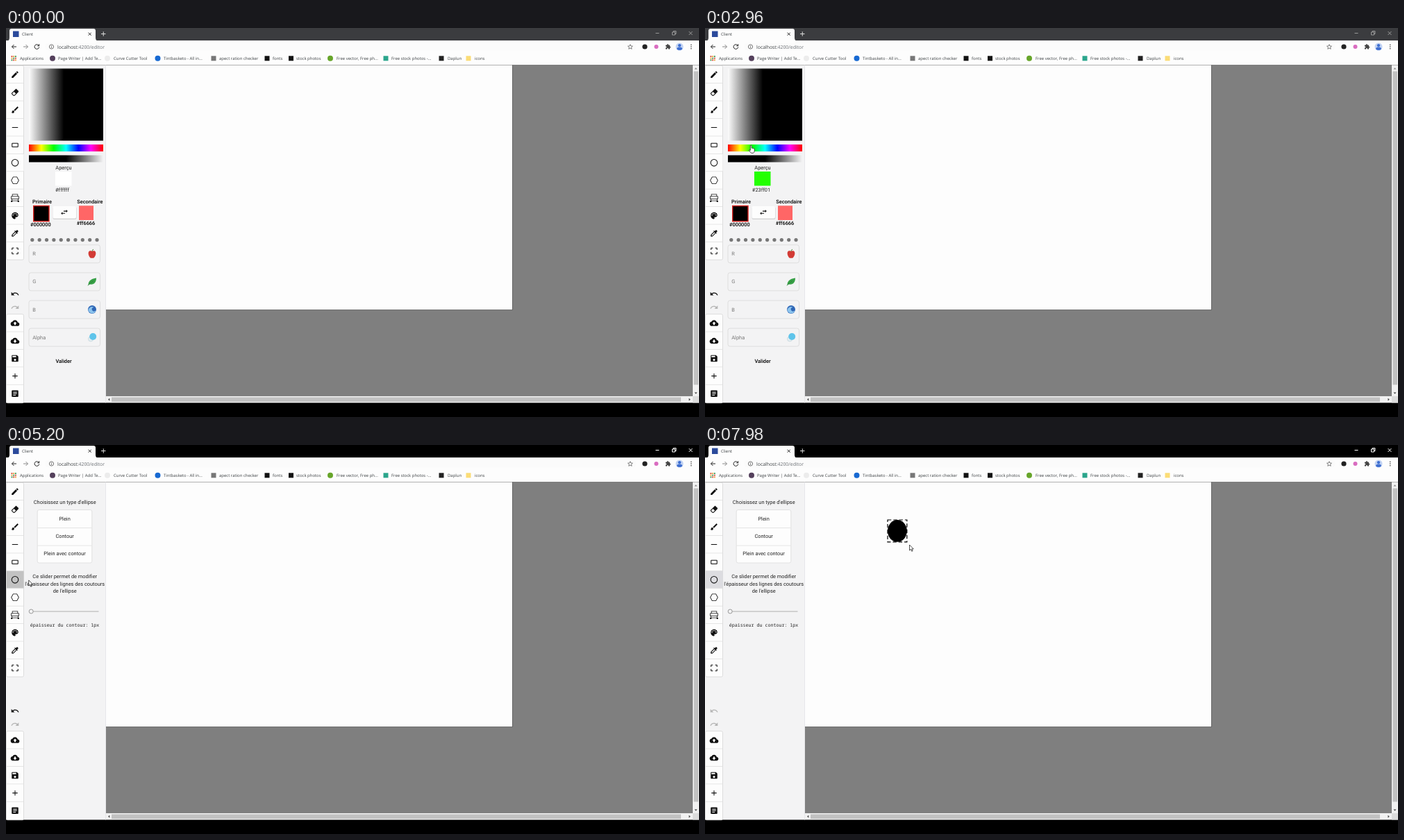
These frames come from a looping animation (998 by 561 pixels, 8 s). An HTML page:

```html
<!DOCTYPE html>
<html lang="fr">
<head>
<meta charset="utf-8">
<title>Client</title>
<style>
  html, body { margin: 0; width: 100%; height: 100%; overflow: hidden; background: #000; }
  svg { display: block; width: 100vw; height: 100vh; }
  text { font: 7.4px Roboto, sans-serif; fill: #222; text-rendering: geometricPrecision; white-space: pre; }
  .ui { font: 5.97px "Open Sans", sans-serif; fill: #3c4043; }
  .url { font-size: 6.87px; }
  .mid { text-anchor: middle; }
  .strong { font-weight: 500; fill: #000; }
  .muted { fill: #777; }
  .mono { font: 6.65px "Noto Sans Mono", monospace; }
  .tip { font-size: 5px; font-weight: 500; fill: #fff; }
  .line { fill: none; stroke: #222; stroke-width: 1; }
</style>
</head>
<body>
<svg id="stage" viewBox="0 0 998 561"></svg>
<script>
const LOOP = 8000;
const HUE = { x: 33, width: 107 };
const TOOL_PITCH = 25.43;
const DRAW_START = 7560;

const rect = (x, y, w, h, fill, extra = '') =>
  `<rect x="${x}" y="${y}" width="${w}" height="${h}" fill="${fill}" ${extra}/>`;
const circle = (x, y, r, fill, extra = '') =>
  `<circle cx="${x}" cy="${y}" r="${r}" fill="${fill}" ${extra}/>`;
const path = (d, extra = 'class="line"') => `<path d="${d}" ${extra}/>`;
const text = (x, y, str, cls = '', extra = '') =>
  `<text x="${x}" y="${y}" class="${cls}" ${extra}>${str}</text>`;
const icon = (x, y, d, extra = 'fill="#111"', scale = 0.53) =>
  `<path transform="translate(${x} ${y}) scale(${scale}) translate(-12 -12)" fill-rule="evenodd" d="${d}" ${extra}/>`;
const gradient = (id, stops) => `<linearGradient id="${id}">` +
  stops.map(([at, color, alpha = 1]) => `<stop offset="${at}" stop-color="${color}" stop-opacity="${alpha}"/>`).join('') +
  '</linearGradient>';
const range = (n, fn) => Array.from({ length: n }, (_, i) => fn(i)).join('');

const CLOUD = 'M19.35 10.04C18.67 6.59 15.64 4 12 4 9.11 4 6.6 5.64 5.35 8.04 2.34 8.36 0 10.91 0 14c0 3.31 2.69 6 6 6h13c2.76 0 5-2.24 5-5 0-2.64-2.05-4.78-4.65-4.96z';
const ICONS = {
  pencil: 'M3 17.25V21h3.75L17.81 9.94l-3.75-3.75zM20.71 7.04c.39-.39.39-1.02 0-1.41l-2.34-2.34c-.39-.39-1.02-.39-1.41 0l-1.83 1.83 3.75 3.75z',
  eraser: 'M16.24 3.56l4.95 4.94c.78.79.78 2.05 0 2.84L12 20.53a4 4 0 0 1-5.66 0L2.81 17c-.78-.79-.78-2.05 0-2.84l10.6-10.6c.79-.78 2.05-.78 2.83 0M4.22 15.58l3.54 3.53c.78.79 2.04.79 2.83 0l3.53-3.53-4.95-4.95z',
  brush: 'M7 14c-1.66 0-3 1.34-3 3 0 1.31-1.16 2-2 2 .92 1.22 2.49 2 4 2 2.21 0 4-1.79 4-4 0-1.66-1.34-3-3-3zm13.71-9.37l-1.34-1.34c-.39-.39-1.02-.39-1.41 0L9 12.25 11.75 15l8.96-8.96c.39-.39.39-1.02 0-1.41z',
  line: 'M4 11h16v2H4z',
  box: 'M5 6h14a2 2 0 0 1 2 2v8a2 2 0 0 1-2 2H5a2 2 0 0 1-2-2V8a2 2 0 0 1 2-2zM5 8v8h14V8z',
  ellipse: 'M12 2a10 10 0 1 0 0 20a10 10 0 1 0 0-20zM12 4a8 8 0 1 1 0 16a8 8 0 1 1 0-16z',
  hexagon: 'M6.5 2h11L23 12l-5.5 10h-11L1 12zM7.5 3.6L2.8 12l4.7 8.4h9L21.2 12l-4.7-8.4z',
  stamp: 'M4 1h16v6h3v8h-2v4h2v4h-4v-3H5v3H1v-4h2v-4H1V7h3zM5.5 2.5V7h13V2.5zM2.5 8.5v5h19v-5zM4.5 15v3.5h15V15z',
  palette: 'M12 3c-4.97 0-9 4.03-9 9s4.03 9 9 9c.83 0 1.5-.67 1.5-1.5 0-.39-.15-.74-.39-1.01-.23-.26-.38-.61-.38-.99 0-.83.67-1.5 1.5-1.5H16c2.76 0 5-2.24 5-5 0-4.42-4.03-8-9-8zM6.5 9a1.5 1.5 0 1 0 0 3a1.5 1.5 0 1 0 0-3zM9.5 5a1.5 1.5 0 1 0 0 3a1.5 1.5 0 1 0 0-3zM14.5 5a1.5 1.5 0 1 0 0 3a1.5 1.5 0 1 0 0-3zM17.5 9a1.5 1.5 0 1 0 0 3a1.5 1.5 0 1 0 0-3z',
  dropper: 'M20.71 5.63l-2.34-2.34c-.39-.39-1.02-.39-1.41 0l-3.12 3.12-1.93-1.91-1.41 1.41 1.42 1.42L3 16.25V21h4.75l8.92-8.92 1.42 1.42 1.41-1.41-1.92-1.92 3.12-3.12c.4-.4.4-1.03.01-1.42zM6.92 19L5 17.08l8.06-8.06 1.92 1.92z',
  frame: 'M3 5v4h2V5h4V3H5c-1.1 0-2 .9-2 2zm2 10H3v4c0 1.1.9 2 2 2h4v-2H5zm14 4h-4v2h4c1.1 0 2-.9 2-2v-4h-2zm0-16h-4v2h4v4h2V5c0-1.1-.9-2-2-2z',
  upload: CLOUD + 'M14 13v4h-4v-4H7l5-5 5 5z',
  download: CLOUD + 'M17 13l-5 5-5-5h3V9h4v4z',
  save: 'M17 3H5c-1.11 0-2 .9-2 2v14c0 1.1.89 2 2 2h14c1.1 0 2-.9 2-2V7zM12 13a3 3 0 1 0 0 6a3 3 0 1 0 0-6zM15 9H5V5h10z',
  add: 'M19 13h-6v6h-2v-6H5v-2h6V5h2v6h6z',
  article: 'M19 3H5c-1.1 0-2 .9-2 2v14c0 1.1.9 2 2 2h14c1.1 0 2-.9 2-2V5c0-1.1-.9-2-2-2zM14 17H7v-2h7zM17 13H7v-2h10zM17 9H7V7h10z',
};
const UNDO = 'M12.5 8c-2.65 0-5.05.99-6.9 2.6L2 7v9h9l-3.62-3.62c1.39-1.16 3.16-1.88 5.12-1.88 3.54 0 6.55 2.31 7.6 5.5l2.37-.78C21.08 11.03 17.15 8 12.5 8z';
const REDO = 'M18.4 10.6C16.55 8.99 14.15 8 11.5 8c-4.65 0-8.58 3.03-9.96 7.22L3.9 16c1.05-3.19 4.05-5.5 7.6-5.5 1.95 0 3.73.72 5.12 1.88L13 16h9V7z';
const SWAP = 'M6.99 11L3 15l3.99 4v-3H14v-2H6.99zM21 9l-3.99-4v3H10v2h7.01v3z';
const PUZZLE = 'M20.5 11H19V7c0-1.1-.9-2-2-2h-4V3.5a2.5 2.5 0 0 0-5 0V5H4c-1.1 0-2 .9-2 2v3.8h1.5a2.7 2.7 0 0 1 0 5.4H2V20c0 1.1.9 2 2 2h3.8v-1.5a2.7 2.7 0 0 1 5.4 0V22H17c1.1 0 2-.9 2-2v-4h1.5a2.5 2.5 0 0 0 0-5z';
const STAR = 'M12 2l3 7 7.5.6-5.700 5 1.700 7.400L12 18l-6.500 4 1.700-7.400-5.700-5L9 9z';

// Bookmark: text x, label, icon shape, icon x, icon colour
const BOOKMARKS = [
  [75, 'Page Writer | Add Te...', 'dot', 67, '#54405c'],
  [155, 'Curve Cutter Tool', 'dot', 146, '#ececec'],
  [227, 'Tintbasketo - All in...', 'dot', 218.5, '#1769d2'],
  [307, 'apect ration checker', 'box', 299, '#777'],
  [384, 'fonts', 'box', 376, '#111'],
  [418, 'stock photos', 'box', 410.5, '#111'],
  [476, 'Free vector, Free ph...', 'dot', 467, '#67a52a'],
  [555, 'Free stock photos -...', 'box', 547, '#2ba58c'],
  [636, 'Daplun', 'box', 627, '#222'],
  [675, 'icons', 'box', 666, '#fbdc76'],
];

function browser() {
  const apps = ['#d9453a', '#e8a33a', '#3b9a58'];
  return rect(0, 0, 998, 19, '#000', 'id="titlebar"') +
    path('M2 18.500Q5 18 5 14V4Q5 1 8 1H126Q129 1 129 4V14Q129 18 132 18.500z', 'fill="#fdfdfd"') +
    rect(0, 18, 998, 35.5, '#fdfdfd') +
    rect(10, 4.5, 8.5, 8.5, '#2b4a9b') + text(23, 11, 'Client', 'ui') +
    path('M118.700 6.700l4 4m0-4l-4 4') +
    path('M137 8.500h6.500M140.250 5.250v6.500', 'stroke="#ddd"') +
    `<g id="windowButtons" class="line">${path('M935.500 7.500h5M983.500 5l5 5m0-5l-5 5M959.500 6h4v4h-4zM961 6V4.500h4v4h-1.500', '')}</g>` +
    path('M15 27H8.500m3-3l-3 3 3 3') +
    path('M25 27h6.500m-3-3l3 3-3 3', 'class="line" style="stroke:#888"') +
    path('M47 25a3.300 3.300 0 1 0 .7 2.500M47.800 23.300v2.500h-2.500') +
    rect(56, 21.5, 852, 11, '#fbfbfb', 'rx="5.500"') +
    circle(65.5, 27, 3.1, 'none', 'stroke="#555" stroke-width=".8"') + path('M65.500 26.500v2.300M65.500 25v.8', 'stroke="#555" stroke-width=".8"') +
    text(74, 29.6, 'localhost<tspan fill="#6b6f74">:4200/editor</tspan>', 'ui url') +
    icon(899, 27, STAR, 'fill="none" stroke="#444" stroke-width="2"', 0.33) +
    circle(920, 27, 3.6, '#222') + circle(936.5, 27, 3, '#d96cc0') +
    icon(953.5, 27, PUZZLE, 'fill="#444"', 0.36) +
    circle(970, 27, 5.5, '#c3d4f3') + circle(970, 25.2, 2.1, '#3f6fd0') + path('M966 30.500q0-3 4-3t4 3q-4 3-8 0z', 'fill="#3f6fd0"') +
    range(3, i => circle(986.7, 24.2 + i * 2.8, 0.8, '#333')) +
    range(9, i => rect(7.5 + i % 3 * 2.7, 40 + Math.floor(i / 3) * 2.7, 1.9, 1.9, apps[(i % 3 + Math.floor(i / 3)) % 3])) +
    text(20, 46, 'Applications', 'ui') +
    BOOKMARKS.map(([x, label, shape, ix, color]) => text(x, 46, label, 'ui') +
      (shape === 'dot' ? circle(ix, 43.8, 4, color) : rect(ix - 3.5, 40.3, 7, 7, color))).join('');
}

function workspace() {
  return rect(144, 53.5, 845, 478, '#7f7f7f') +
    rect(144, 53.5, 585.5, 353.5, '#4c4c4c') + rect(144, 53.5, 585, 352.7, '#fdfdfd') +
    rect(989, 53.5, 9, 487, '#f1f1f1') + rect(144, 531, 845, 9.5, '#f1f1f1') +
    rect(989, 531, 9, 9.5, '#dcdcdc') +
    rect(990.5, 62.5, 6.5, 452, '#c1c1c1') + rect(152, 532.5, 820, 6.5, '#c1c1c1') +
    path('M991.500 59.500h4l-2-2.200z', 'fill="#888"') +
    path('M991.500 525.500h4l-2 2.200zM983.500 533.700v4l2.200-2zM149.300 533.700v4l-2.200-2z', 'fill="#444"');
}

function toolbar() {
  const names = Object.keys(ICONS);
  const group = (y, list, h) => rect(0.5, y, 25, h, '#fdfdfd', 'stroke="#dcdcdc" rx="2"') +
    (y < 100 ? rect(1, 181.6, 24.5, 25, '#fdfdfd', 'id="ellipseTool"') : '') +
    list.map((name, i) => (i ? rect(1, y + i * TOOL_PITCH - 0.5, 24.5, 0.8, '#dfdfdf') : '') +
      icon(13, y + 12.9 + i * TOOL_PITCH, ICONS[name])).join('');
  return rect(0, 53.5, 144, 487, '#f3f3f4') + rect(143, 53.5, 0.8, 487, '#e4e4e8') +
    group(54.3, names.slice(0, 11), 280) + group(412.7, names.slice(11), 128) +
    icon(13, 383.5, UNDO, 'id="undo"') + icon(13, 402.8, REDO, 'fill="#b5b5b5"');
}

function colorPanel() {
  const badges = [
    path('M124 322c-3-2-6 0-5.300 4s3.500 7 5.300 5.500c1.800 1.500 4.600-1.500 5.300-5.500s-2.300-6-5.300-4z', 'fill="#d23b35"') + path('M124 322q0-2 2-2.800', 'stroke="#4c7a2e" fill="none"'),
    path('M118.500 371c0-5 2-9 11.500-10.500c0 6-3 10.500-9.500 9z', 'fill="#37a046"') + path('M118 371.500q4-5 8-7', 'stroke="#2a7d36" stroke-width=".8" fill="none"'),
    circle(124, 406, 6, '#2f66b5') + path('M118.500 406q3-5.500 8-3.500q-4 1-2.500 4.500q2 3 5.500.5q-2 5-7 3.700q-4-1.700-4-5.200z', 'fill="#8cc4ee"'),
    circle(122, 448.500, 3.500, '#e3eef2', 'stroke="#b8cdd4" stroke-width=".6"') + circle(125.200, 445, 5, '#5fc4ea'),
  ];
  return rect(33, 58.5, 107, 104, 'url(#shade)') +
    rect(HUE.x, 168, HUE.width, 10, 'url(#hue)') + rect(33, 183.5, 107, 10, 'url(#alpha)') +
    text(83, 203.7, 'Aperçu', 'mid') + rect(71, 207, 23.5, 20.5, '#fff', 'id="preview"') +
    text(81, 235.8, '#ffffff', 'mid', 'id="hex"') +
    text(38, 253, 'Primaire', 'strong') + text(102.3, 253, 'Secondaire', 'strong') +
    rect(39.7, 256.5, 22.3, 22.3, '#000', 'stroke="#d8201c" stroke-width="1.400"') +
    rect(67.500, 258, 34, 18, '#000', 'rx="2" opacity=".15"') + rect(67.500, 257, 33.500, 17.700, '#fdfdfd', 'rx="2"') +
    icon(84, 265.7, SWAP) + rect(105, 256.3, 21, 20.7, '#ff6666') +
    text(35, 285.7, '#000000', 'strong') + text(101.700, 283.8, '#ff6666', 'strong') +
    range(10, i => circle(37.8 + i * 10.36, 305.6, 2.6, '#777')) +
    ['R', 'G', 'B', 'Alpha'].map((label, i) => rect(33, 312.8 + i * 40.1, 102.5, 26, 'none', 'stroke="#dedede" rx="3"') +
      text(38.3, 328.3 + i * 40.1, label, 'muted') + badges[i]).join('') +
    text(83, 482.5, 'Valider', 'mid strong');
}

function ellipsePanel() {
  return text(84.7, 84.8, "Choisissez un type d'ellipse", 'mid') +
    rect(45.2, 93.5, 78.6, 76.5, '#fdfdfd', 'stroke="#dcdcdc" stroke-width=".8" rx="2.500"') +
    ['Plein', 'Contour', 'Plein avec contour'].map((label, i) =>
      (i ? rect(45.5, 93.8 + i * TOOL_PITCH, 78, 0.8, '#dfdfdf') : '') + text(84.6, 108.6 + i * TOOL_PITCH, label, 'mid')).join('') +
    ['Ce slider permet de modifier', "l'épaisseur des lignes des coutours", "de l'ellipse"]
      .map((row, i) => text(84.7, 192.2 + i * 10.5, row, 'mid')).join('') +
    rect(36, 239.5, 97.5, 1.1, '#b5b5b5') + circle(36.2, 240, 3, '#f3f3f4', 'stroke="#999"') +
    text(34.7, 262.3, 'épaisseur du contour: 1px', 'mono');
}

const stage = document.getElementById('stage');
stage.innerHTML = '<defs>' +
  gradient('shade', [[0, '#fdfdfd'], [0.47, '#000']]) +
  gradient('hue', ['#f00', '#ff0', '#0f0', '#0ff', '#00f', '#f0f', '#f00'].map((c, i) => [i / 6, c])) +
  gradient('alpha', [[0.5, '#000'], [1, '#000', 0]]) + '</defs>' +
  browser() + workspace() + toolbar() +
  `<g id="colorPanel">${colorPanel()}</g><g id="ellipsePanel">${ellipsePanel()}</g>` +
  `<g id="tooltip">${rect(33, 186, 35, 16.5, '#616161', 'rx="2" opacity=".95"')}${text(50.4, 196, 'Outil ellipse', 'mid tip')}</g>` +
  '<g id="drawing"><ellipse id="shape"/><rect id="bounds" fill="none" stroke="#000" stroke-width="1.200" stroke-dasharray="5.300 3"/></g>' +
  path('M0 0v8l1.900-1.700 1.400 3 1.300-.6-1.300-2.800h2.500z', 'id="arrow" fill="#fff" stroke="#222" stroke-width=".8"') +
  path('M-.9 .6q.9-1.200 1.800 0v3.600q1-.5 1.500.3q1-.4 1.400.4q1.200-.2 1.200.9v2.500q-.4 2.700-1.700 3h-3q-1.700-1.500-3.300-4q.3-1.300 2.100.2z', 'id="hand" fill="#fff" stroke="#222" stroke-width=".8"');
const el = id => document.getElementById(id);

// Pointer path: time, x, y
const POINTER = [
  [650, 1002, 300], [1300, 655, 217], [1400, 650, 216], [1750, 560, 206], [2450, 138, 174],
  [2960, 66.29, 169], [3500, 40, 172], [3850, 24, 181], [4200, 14, 194], [4750, 14, 194],
  [5200, 32.5, 195], [6200, 260, 142], [6560, 270, 139], [7400, 263, 108], [DRAW_START, 263, 108], [7980, 294.5, 144],
];

function pointerAt(t) {
  const i = POINTER.findIndex(key => key[0] > t);
  if (i === 0) return [POINTER[0][1], POINTER[0][2]];
  if (i < 0) return POINTER[POINTER.length - 1].slice(1);
  const [t0, x0, y0] = POINTER[i - 1], [t1, x1, y1] = POINTER[i];
  const k = (t - t0) / (t1 - t0);
  return [x0 + (x1 - x0) * k, y0 + (y1 - y0) * k];
}

function hueHex(x) {
  const pos = (Math.max(x, 33.77) - HUE.x) / HUE.width * 6;
  const floor = pos > 1 ? 1 : 0;
  return '#' + [0, 4, 2].map(shift => {
    const level = Math.min(1, Math.abs((pos + shift) % 6 - 3) - 1);
    return Math.max(floor, Math.round(255 * level)).toString(16).padStart(2, '0');
  }).join('');
}

const show = (id, on) => el(id).setAttribute('display', on ? 'inline' : 'none');
function set(id, attrs) {
  for (const name in attrs) el(id).setAttribute(name, attrs[name]);
}

function render(t) {
  const [x, y] = pointerAt(t);
  const focused = t >= 4400, ellipseMode = t >= 4560, drawing = t >= DRAW_START;

  set('titlebar', { fill: focused ? '#000' : '#3b3c3f' });
  el('windowButtons').style.stroke = focused ? '#fff' : '#999';
  show('colorPanel', !ellipseMode);
  show('ellipsePanel', ellipseMode);
  show('tooltip', t >= 4200 && !ellipseMode);
  set('ellipseTool', { fill: t >= 5300 ? '#dcdce0' : ellipseMode ? '#c2c2c2' : t >= 4150 ? '#ededed' : '#fdfdfd' });
  set('undo', { fill: drawing ? '#b5b5b5' : '#111' });

  const color = t < 4560 && x < HUE.x + HUE.width ? hueHex(x) : '#ffffff';
  set('preview', { fill: color });
  el('hex').textContent = color;

  // The drawn shape trails the pointer slightly.
  show('drawing', drawing);
  const [ex, ey] = pointerAt(Math.max(DRAW_START, t - 50));
  const w = Math.max(0, ex - 263), h = Math.max(0, ey - 108);
  set('shape', { cx: 263 + w / 2, cy: 108 + h / 2, rx: w / 2, ry: h / 2 });
  set('bounds', { x: 263, y: 108, width: w, height: h });

  const overHue = x > HUE.x && x < 140 && y > 168 && y < 179;
  const hand = !ellipseMode && (overHue || x < 26) || ellipseMode && x < 26;
  show('hand', hand);
  show('arrow', !hand && t > 650);
  set(hand ? 'hand' : 'arrow', { transform: `translate(${x} ${y})` });
}

function tick() {
  render(performance.now() % LOOP);
  requestAnimationFrame(tick);
}
tick();
</script>
</body>
</html>
```
